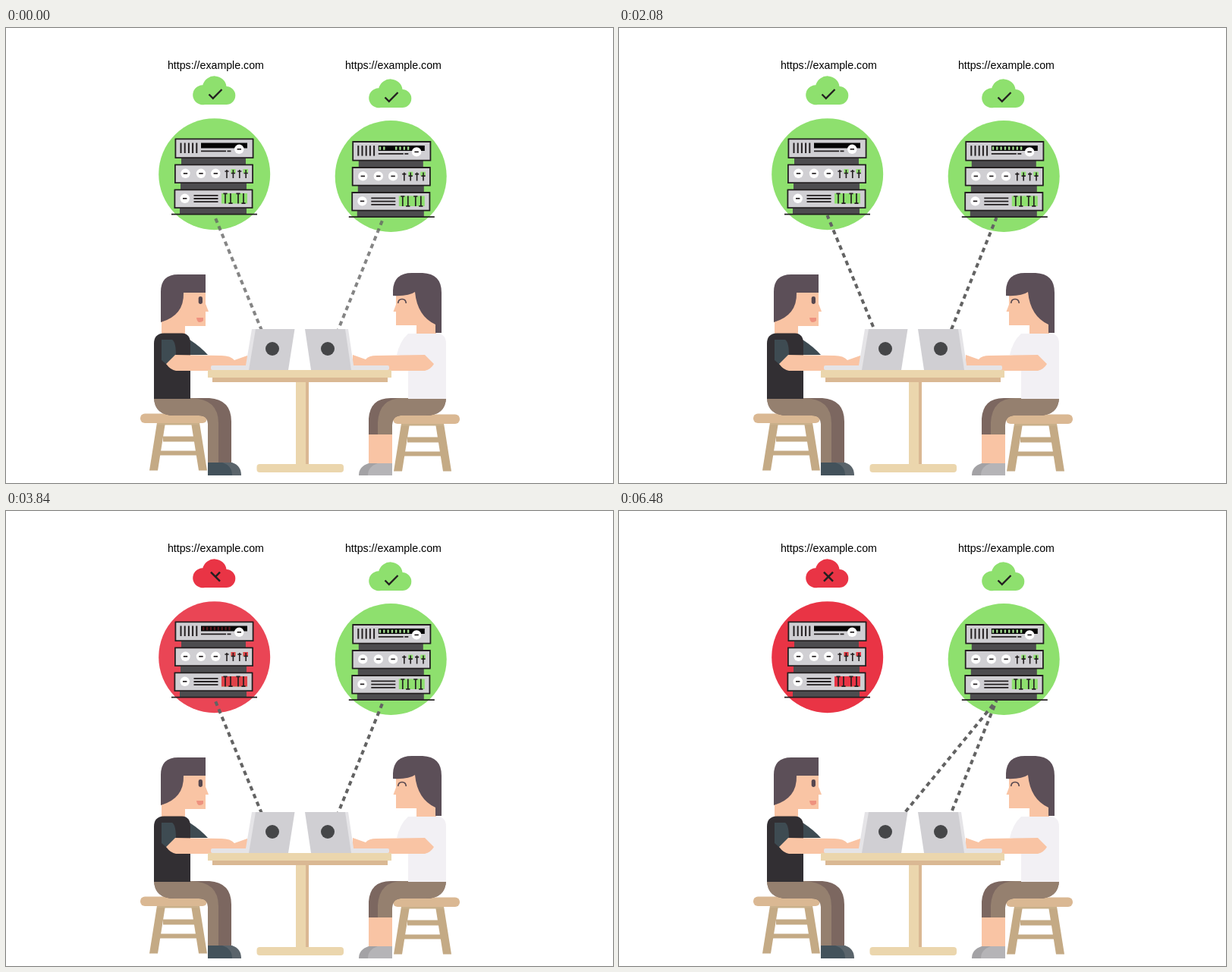
Write an HTML page with a canvas that moves like this. It is 800 by 600 pixels and loops after 6.52 s.

```html
<!DOCTYPE html>
<html lang="en">
<head>
<meta charset="utf-8">
<title>Server failover</title>
<style>
html, body { margin: 0; width: 100%; height: 100%; overflow: hidden; background: #fff; }
canvas { display: block; width: 800px; height: 600px; }
</style>
</head>
<body>
<canvas id="stage" width="800" height="600"></canvas>
<script>
const ctx = document.getElementById('stage').getContext('2d');
const LOOP = 6520;
const GREEN = '#8ee06e', RED = '#e93445', INK = '#231f20', STEEL = '#d0cfd3', SLATE = '#4d4c4f';
const SKIN = '#f9c4a4', HAIR = '#5c4f58', WOOD = '#ebd6ad', TAN = '#dab893', LEG = '#c4aa85';
const PANTS = '#95806f', PANTS_DARK = '#7c6760';

const ramp = (t, a, b) => Math.min(1, Math.max(0, (t - a) / (b - a)));

function rect(x1, y1, x2, y2, fill, r = 0) {
  ctx.fillStyle = fill;
  ctx.beginPath();
  ctx.roundRect(x1, y1, x2 - x1, y2 - y1, r);
  ctx.fill();
}
function disc(x, y, r, fill) {
  ctx.fillStyle = fill;
  ctx.beginPath();
  ctx.arc(x, y, r, 0, 7);
  ctx.fill();
}
function shape(d, fill) {
  ctx.fillStyle = fill;
  ctx.fill(new Path2D(d));
}
function stroke(d, width, color = INK) {
  ctx.strokeStyle = color;
  ctx.lineWidth = width;
  ctx.stroke(new Path2D(d));
}
function faded(alpha, draw) {
  if (alpha <= 0) return;
  ctx.save();
  ctx.globalAlpha *= alpha;
  draw();
  ctx.restore();
}
function moved(x, y, draw) {
  ctx.save();
  ctx.translate(x, y);
  draw();
  ctx.restore();
}

function cloud(color) {
  shape('M262 101A13 13 0 1 1 259.3 75.3A16 16 0 0 1 290.6 77A12 12 0 0 1 290 101Z', color);
}
function check() {
  stroke('M267.5 87.5L272.8 92.8L284.5 81', 2.3);
}
function cross(p) {
  const a = 12 * ramp(p, 0, .5), b = 12 * ramp(p, .5, 1);
  if (a) stroke(`M270 80.7l${a} ${a}`, 2.4);
  if (b) stroke(`M282 80.7l${-b} ${b}`, 2.4);
}

function knob(x, y) {
  disc(x, y, 6.2, '#fff');
  stroke(`M${x - 2.7} ${y}h5.4`, 1.7);
}
function unit(x1, y1, x2, y2) {
  rect(x1, y1, x2, y2, INK, .5);
  rect(x1 + 1.8, y1 + 1.8, x2 - 1.8, y2 - 1.8, STEEL);
}
function sliderLights(color) {
  rect(296.5, 186, 302.5, 191.5, color);
  rect(312.5, 186, 319, 191.5, color);
  rect(284, 218, 318, 231.5, color);
}
function server(lights, leds) {
  rect(231, 171, 316, 181, SLATE);
  rect(230, 203, 317, 214, SLATE);
  rect(229, 237, 317, 246, SLATE);

  unit(222.5, 145.5, 326.5, 172);
  for (let i = 0; i < 5; i++) rect(229.5 + i * 5.2, 151.5, 231.5 + i * 5.2, 165, INK);
  rect(257, 151.5, 318, 158.5, '#050505');
  leds();
  stroke('M257 162.3h33M291.5 162.3h5', 1.7);
  knob(307.3, 159.8);

  unit(222, 179.5, 326, 205);
  [236.5, 257, 276.3].forEach(x => knob(x, 191.8));
  unit(221.5, 212.5, 325.5, 238);
  knob(235.7, 224.8);
  stroke('M247.5 220.8h32M247.5 225h32M247.5 229.2h32', 1.8);

  lights();
  for (let i = 0; i < 4; i++) {
    const x = 291 + i * 8.4, odd = i % 2;
    stroke(`M${x} 187v11M${x - 2.6} ${odd ? 191.5 : 189}h5.2`, 1.6);
    const sx = [289, 296, 306, 313][i];
    stroke(`M${sx} 218v13.5M${sx - 2.6} ${odd ? 231.2 : 218.4}h5.2`, 1.7);
  }
  stroke('M218 245.6h113', 1.8);
}

function leftLeds(t) {
  const n = Math.round(6 + 2 * ramp(t, 2900, 3400));
  const level = ramp(t, 2450, 2800) * (1 - .55 * ramp(t, 3300, 3800)) * (1 - ramp(t, 3900, 4300));
  const color = t < 3250 ? '#6cbf58' : '#b52a38';
  faded(level, () => {
    for (let i = 0; i < n; i++) rect(259 + i * 4.9, 152.8, 261.4 + i * 4.9, 157.2, color);
  });
}
function rightLeds(t) {
  const gap = 2.5 + (t % 1190) / 45;
  for (let i = 0; i < 8; i++) {
    if (Math.abs(i - gap) < 1.1) continue;
    rect(258 + i * 5.3, 152.8, 260.4 + i * 5.3, 157.2, '#9fd98c');
  }
}

function link(x1, y1, x2, y2, t, alpha) {
  const shift = t > 4400 ? .5 : 0;
  faded(alpha, () => {
    ctx.setLineDash([6, 5]);
    ctx.lineDashOffset = 11 * (t / 320 - shift) - 4.5;
    stroke(`M${x1} ${y1}L${x2} ${y2}`, 4, '#636363');
  });
}

function stool(x, y, legX) {
  moved(legX, y, () => {
    shape('M10 12H21L11 75H0ZM55 12H66L76 75H65Z', LEG);
    rect(18, 30, 59, 37, LEG);
    rect(14, 49, 62, 55, LEG);
    rect(10, 12, 66, 15, '#c9b08a');
  });
  rect(x, y, x + 88, y + 12.5, TAN, 6);
}

function man() {
  shape('M195 488H268Q297 490 297 519V574H266V522Q266 511 254 511H222Q196 511 195 488Z', PANTS_DARK);
  shape('M195 488H244Q280 489 280 521V574H266V522Q266 511 254 511H222Q196 511 195 488Z', PANTS);
  shape('M284 573H298Q310 577 310 590H284Z', '#5a646b');
  shape('M266 573H285Q298 577 298 590H266Z', '#43525b');

  rect(205, 349, 263, 393, SKIN);
  rect(205, 385, 236, 405, SKIN);
  shape('M262 361L267 374H262Z', SKIN);
  shape('M204 388V348Q204 325 227 325H263V349H234Q235 379 204 388Z', HAIR);
  rect(253.7, 354, 259, 364, '#55474f', 2.4);
  shape('M251 382H260V386Q258 388 255 388Q252 388 251 382Z', '#ee927f');

  shape('M242 411Q256 420 266 431H243Z', '#3e4b52');
  shape('M195 489V416Q195 403 208 402.5H232Q243 403 243 416V489Z', '#322f33');
  shape('M205 411H219Q224 414 224 432L212 444L205 438Z', '#3e4b52');
  shape('M223 431L284 432Q296 432 301 438L318 432V448H280V452H224Q217 451 211 443Z', SKIN);
}

function woman() {
  shape('M478 536V515Q480 488 507 488H580Q579 511 553 511H520Q509 512 509 524V536Z', PANTS_DARK);
  shape('M490 536V520Q492 488 523 488H580Q579 511 553 511H520Q509 512 509 524V536Z', PANTS);
  rect(478, 536, 509, 575, SKIN);
  shape('M491 574H478Q465 578 465 590H491Z', '#a3a2a5');
  shape('M509 574H490Q477 578 477 590H509Z', '#b5b4b7');

  rect(514, 347, 567, 392, SKIN);
  rect(541, 385, 567, 405, SKIN);
  shape('M515 362L510.5 374H515Z', SKIN);
  shape('M510 353V346Q511 323 535 323H549Q574 324 574 349V402H566V391Q542 380 539 348Q531 354 510 353Z', HAIR);
  stroke('M516.7 363Q517 357.5 522 357.5Q527 357.5 527.3 363', 1.6, '#55474f');

  shape('M530 403H567Q580 403 580 416V489H530V434L515 431Q519 413 530 403Z', '#f2f0f4');
  shape('M552 431L488 432Q478 432 474 437L457 431V448H495V452H552Q560 450 564 443Z', SKIN);
}

function furniture() {
  rect(382, 466, 399, 577, WOOD);
  rect(395, 466, 399, 575, TAN);
  rect(330.5, 575, 445, 586, WOOD, 4);
  rect(272, 459, 503, 467, TAN);
  rect(266, 451, 508, 461, WOOD);
}

function laptops() {
  rect(270, 445, 322, 451, '#e5e4e7', 2);
  rect(452, 445, 505, 451, '#e5e4e7', 2);
  shape('M324 397H335L328 451H315Z', '#e5e4e7');
  shape('M329 397H380.5L372 451H320Z', STEEL);
  shape('M440 397H451L459 451H446Z', '#e5e4e7');
  shape('M394 397H447L455 451H402Z', STEEL);
  disc(351, 423, 9, '#454648');
  disc(424, 423, 9, '#454648');
}

function draw(t) {
  ctx.setTransform(1, 0, 0, 1, 0, 0);
  ctx.fillStyle = '#fff';
  ctx.fillRect(0, 0, 800, 600);

  ctx.fillStyle = '#000';
  ctx.font = '14.2px "Liberation Sans", Arial, sans-serif';
  ctx.textAlign = 'center';
  ctx.fillText('https://example.com', 276.4, 54);
  ctx.fillText('https://example.com', 510.4, 54);

  const ok = 1 - ramp(t, 2240, 2880);
  const down = ramp(t, 3200, 3900);
  const swap = ramp(t, 4340, 4800);

  faded(1 - ramp(t, 2240, 2700), () => { cloud(GREEN); check(); });
  faded(ramp(t, 3200, 3800), () => { cloud(RED); cross(ramp(t, 3500, 3950)); });
  moved(232, 4, () => { cloud(GREEN); check(); });

  faded(ok, () => disc(274.7, 192.7, 73.5, GREEN));
  faded(down, () => disc(274.7, 192.7, 73.5, RED));
  disc(507.2, 195.5, 73.5, GREEN);

  const enter = .78 + .22 * ramp(t, 0, 300);
  link(274.5, 247, 337.5, 400, t, enter * (1 - swap * 1.02));
  link(497.5, 250, 437, 400, t, enter);
  link(497.5, 250, 374, 401, t, swap);

  server(() => {
    sliderLights(GREEN);
    faded(down, () => sliderLights(RED));
  }, () => leftLeds(t));
  moved(233.8, 3.6, () => server(() => sliderLights(GREEN), () => rightLeds(t)));

  stool(177, 508.5, 189);
  stool(510, 509.5, 511);
  man();
  woman();
  furniture();
  laptops();
}

function tick() {
  const t = performance.now() % LOOP;
  draw(Math.floor(t / 40) * 40);
  requestAnimationFrame(tick);
}
draw(0);
requestAnimationFrame(tick);
</script>
</body>
</html>
```
